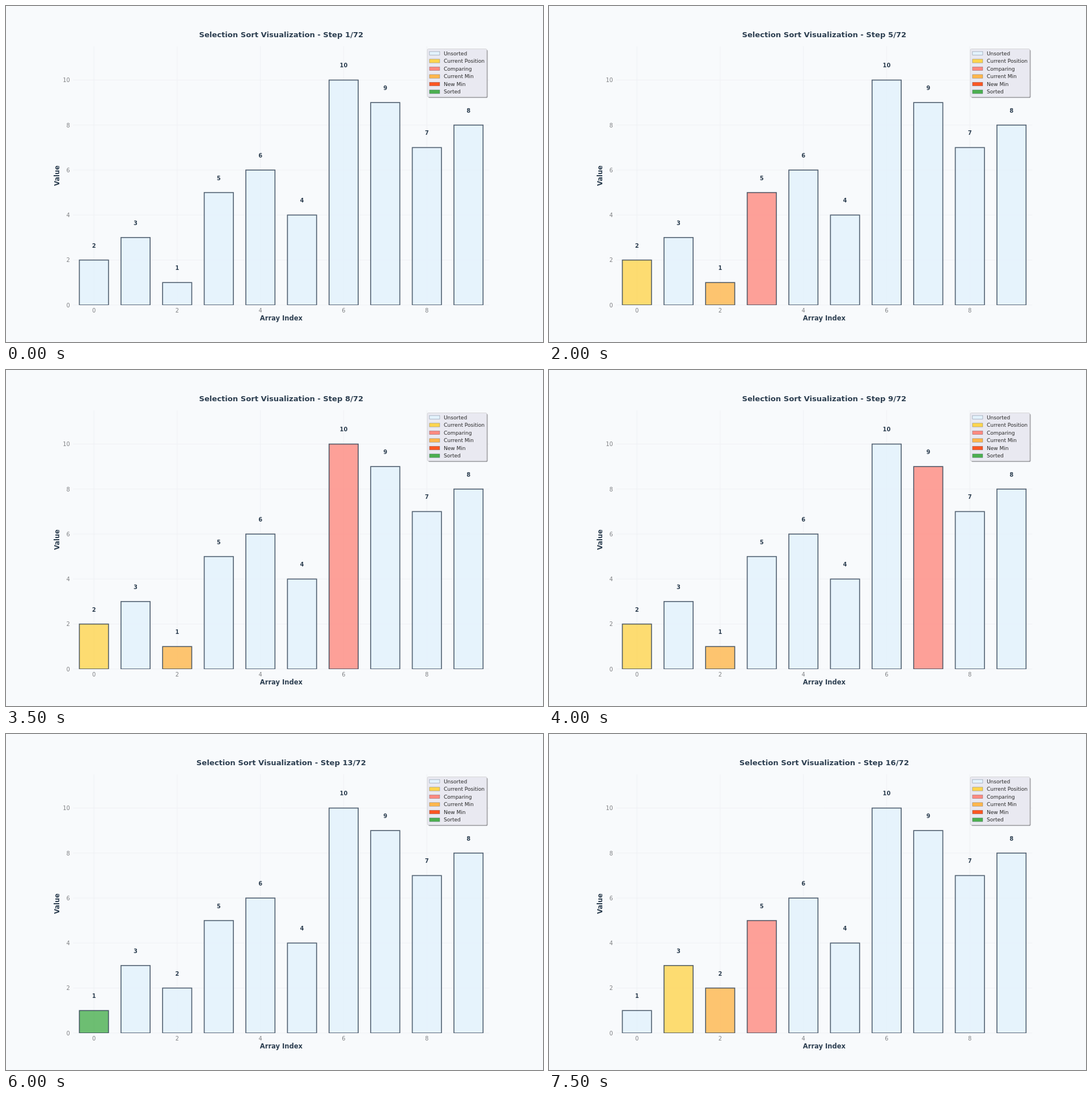
Animation of 947x592 px, one loop 8000 ms. Source, as an HTML page with a canvas:

```html
<!DOCTYPE html>
<html lang="en">
<head>
<meta charset="utf-8">
<title>Selection Sort Visualization</title>
<style>
html, body { margin: 0; width: 100%; height: 100%; overflow: hidden; background: #f8fafc; }
canvas { display: block; width: 947px; height: 592px; }
</style>
</head>
<body>
<canvas id="stage" width="947" height="592"></canvas>
<script>
const ctx = document.getElementById('stage').getContext('2d');

const W = 947, H = 592, PT = 0.822;
const STEP_MS = 500, LOOP_STEPS = 16;
const LEFT = W * 0.125, RIGHT = W * 0.9, TOP = H * 0.12, BOTTOM = H * 0.89;
const MID_X = (LEFT + RIGHT) / 2, MID_Y = (TOP + BOTTOM) / 2;
const UNIT_X = (RIGHT - LEFT) / 10, UNIT_Y = (BOTTOM - TOP) / 11.5;
const INK = '#2c3e50';
const COLORS = {
  'Unsorted': '#e3f2fd',
  'Current Position': '#ffd54f',
  'Comparing': '#ff8a80',
  'Current Min': '#ffb74d',
  'New Min': '#ff5722',
  'Sorted': '#4caf50'
};

const px = i => LEFT + (i + 0.5) * UNIT_X;
const py = v => BOTTOM - v * UNIT_Y;

// Records every state of a selection sort as values plus bar roles.
function sortSteps(values) {
  const arr = [...values], n = arr.length, steps = [];
  const add = (roles = {}) => steps.push({ values: [...arr], roles });
  add();
  for (let i = 0; i < n - 1; i++) {
    let min = i;
    add({ [i]: 'Current Position' });
    for (let j = i + 1; j < n; j++) {
      if (arr[j] < arr[min]) {
        min = j;
        add({ [i]: 'Current Position', [j]: 'New Min' });
      } else {
        add({ [min]: 'Current Min', [j]: 'Comparing', [i]: 'Current Position' });
      }
    }
    if (min !== i) {
      add({ [i]: 'Current Position', [min]: 'New Min' });
      [arr[i], arr[min]] = [arr[min], arr[i]];
    }
    add({ [i]: 'Sorted' });
  }
  add(Object.fromEntries(arr.map((_, i) => [i, 'Sorted'])));
  return steps;
}

const steps = sortSteps([2, 3, 1, 5, 6, 4, 10, 9, 7, 8]);

function text(str, x, y, pt, color = INK, weight = 'bold', align = 'center') {
  ctx.font = `${weight} ${pt * PT}px "DejaVu Sans", sans-serif`;
  ctx.textAlign = align;
  ctx.fillStyle = color;
  ctx.fillText(str, x, y);
}

function line(x1, y1, x2, y2) {
  ctx.beginPath();
  ctx.moveTo(x1, y1);
  ctx.lineTo(x2, y2);
  ctx.stroke();
}

function panel(x, y, w, h, fill) {
  ctx.beginPath();
  ctx.roundRect(x, y, w, h, 1.8);
  ctx.fillStyle = fill;
  ctx.fill();
}

function drawAxes() {
  ctx.strokeStyle = '#eef0f3';
  ctx.lineWidth = 0.82;
  for (let i = 0; i <= 8; i += 2) {
    line(px(i), TOP, px(i), BOTTOM);
    text(i, px(i), 540.3, 12, '#808285', 'normal');
  }
  for (let v = 0; v <= 10; v += 2) {
    line(LEFT, py(v), RIGHT, py(v));
    text(v, 112.7, py(v) + 3.8, 12, '#808285', 'normal', 'right');
  }
  text('Array Index', MID_X, 554.3, 14);
  ctx.save();
  ctx.translate(94.1, MID_Y);
  ctx.rotate(-Math.PI / 2);
  text('Value', 0, 0, 14);
  ctx.restore();
}

function drawBars({ values, roles }) {
  const w = UNIT_X * 0.7;
  ctx.save();
  ctx.beginPath();
  ctx.rect(LEFT, TOP, RIGHT - LEFT, BOTTOM - TOP);
  ctx.clip();
  ctx.globalAlpha = 0.8;
  ctx.strokeStyle = INK;
  ctx.lineWidth = 2 * PT;
  values.forEach((v, i) => {
    const box = [px(i) - w / 2, py(v), w, v * UNIT_Y];
    ctx.fillStyle = COLORS[roles[i] || 'Unsorted'];
    ctx.fillRect(...box);
    ctx.strokeRect(...box);
  });
  ctx.restore();
  values.forEach((v, i) => text(v, px(i), py(v + 0.5) - 2.2, 12));
}

function drawLegend() {
  const x = 743, y = 75.6, w = 104.8, h = 84.6;
  panel(x + 1.7, y + 1.7, w, h, '#9fa0a5');
  panel(x, y, w, h, '#e9e9f1');
  ctx.strokeStyle = '#cccccc';
  ctx.lineWidth = 0.7;
  ctx.stroke();
  Object.entries(COLORS).forEach(([name, color], i) => {
    const cy = 83.4 + i * 13.54;
    ctx.fillStyle = color;
    ctx.fillRect(746.8, cy - 3.2, 18.1, 6.4);
    ctx.strokeStyle = 'rgba(44, 62, 80, 0.5)';
    ctx.lineWidth = 0.6;
    ctx.strokeRect(746.8, cy - 3.2, 18.1, 6.4);
    text(name, 772, cy + 3.2, 11, '#262626', 'normal', 'left');
  });
}

function draw(now) {
  const k = Math.floor(now / STEP_MS) % LOOP_STEPS;
  ctx.fillStyle = '#f8fafc';
  ctx.fillRect(0, 0, W, H);
  drawAxes();
  drawBars(steps[k]);
  drawLegend();
  text(`Selection Sort Visualization - Step ${k + 1}/${steps.length}`, MID_X, 54.6, 16);
}

let start;
function tick(now) {
  start ??= now;
  draw(now - start);
  requestAnimationFrame(tick);
}
draw(0);
requestAnimationFrame(tick);
</script>
</body>
</html>
```
